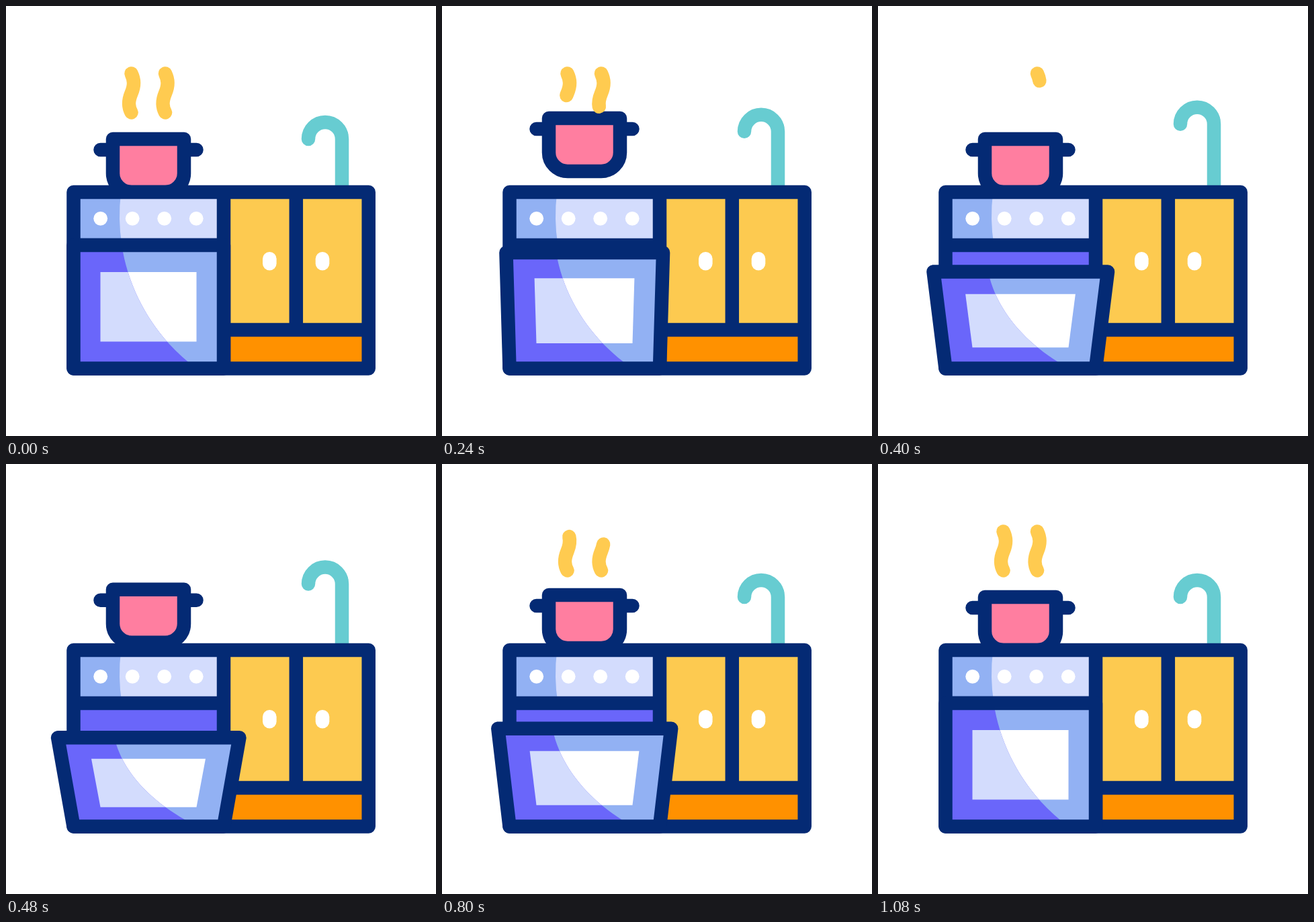
These frames come from a looping animation (640 by 640 pixels, 1520 ms). An HTML page:

```html
<!DOCTYPE html>
<html lang="en">
<head>
<meta charset="utf-8">
<title>Kitchen</title>
<style>
  html, body { margin: 0; width: 100%; height: 100%; overflow: hidden; background: #fff; }
  svg { display: block; width: 100%; height: 100%; }
  .line { fill: none; stroke: #042a74; stroke-width: 20.5; stroke-linecap: round; stroke-linejoin: round; }
  .steam { fill: none; stroke: #ffcb50; stroke-width: 20.5; stroke-linecap: round; }
</style>
</head>
<body>
<svg viewBox="0 0 640 640">
  <defs>
    <clipPath id="shadeClip"><path id="shade"/></clipPath>
  </defs>

  <path id="faucet" fill="none" stroke="#67ccd1" stroke-width="20.5" stroke-linecap="round"/>

  <g id="pot">
    <path fill="#ff7ea0" d="M159 198H265V249a28 28 0 0 1 -28 28H187a28 28 0 0 1 -28 -28Z"/>
    <path class="line" d="M159 198H265V249a28 28 0 0 1 -28 28H187a28 28 0 0 1 -28 -28ZM140.5 214H159M265 214H283.5"/>
  </g>

  <path class="steam" id="steamA" pathLength="1" d="M186.5 100.5C191 110 191.5 118 186.5 130C181.5 142 182 150 186.5 158.5"/>
  <path class="steam" id="steamB" pathLength="1" d="M237 100.5C241.5 110 242 118 237 130C232 142 232.5 150 237 158.5"/>

  <rect x="324" y="277" width="216" height="205" fill="#fdca50"/>
  <rect x="324" y="482" width="216" height="58" fill="#ff9100"/>
  <rect x="101" y="277" width="223" height="79" fill="#d3dcfd"/>
  <path fill="#92b1f3" d="M101 277H171.2A284 284 0 0 0 172.4 356H101Z"/>
  <rect x="101" y="356" width="223" height="184" fill="#6a66fa"/>
  <g fill="#fff">
    <circle cx="140.7" cy="316.3" r="10.4"/>
    <circle cx="188.2" cy="316.3" r="10.4"/>
    <circle cx="235.7" cy="316.3" r="10.4"/>
    <circle cx="283.2" cy="316.3" r="10.4"/>
    <rect x="382" y="366" width="20.6" height="27.6" rx="10.3"/>
    <rect x="460.7" y="366" width="20.6" height="27.6" rx="10.3"/>
  </g>
  <path class="line" d="M100.5 277H539.7V539.5H100.5ZM324 277V539.5M431.8 277V482M324 482H539.7M100.5 356H324"/>

  <path id="panel" fill="#92b1f3"/>
  <path id="glass" fill="#fff"/>
  <g clip-path="url(#shadeClip)">
    <path id="panelShade" fill="#6a66fa"/>
    <path id="glassShade" fill="#d3dcfd"/>
  </g>
  <path class="line" id="doorEdge"/>
</svg>
<script>
  const LOOP = 1520, STEP = 40;
  const el = id => document.getElementById(id);
  const setPath = (d, ...ids) => ids.forEach(id => el(id).setAttribute('d', d));
  const progress = (t, from, to) => Math.min(1, Math.max(0, (t - from) / (to - from)));
  const smooth = p => p * p * (3 - 2 * p);
  const thereAndBack = (t, a, b, c, d) => smooth(progress(t, a, b)) - smooth(progress(t, c, d));
  const quad = (left, right, top, inset, bottom) =>
    `M${left} ${top}H${right}L${right - inset} ${bottom}H${left + inset}Z`;

  function drawDoor(k) {
    const top = 356 + 57 * k, spread = 26 * k;
    setPath(quad(100.5 - spread, 324 + spread, top, spread, 539.5), 'panel', 'panelShade', 'doorEdge');
    setPath(quad(140.5 - 15 * k, 283.5 + 15 * k, 396 + 47.5 * k, 15 * k, 499.5 + 12.5 * k), 'glass', 'glassShade');
    setPath(`M0 ${top}H${172 - 11 * k}L${174 - 11 * k} ${top + 10}` +
      `C${186.4 - 9.5 * k} ${429.8 + 34.5 * k} ${220.3 - 6 * k} ${487.1 + 14.5 * k} ${270.5 - 5 * k} 529.3` +
      `L282 540H0Z`, 'shade');
  }

  // The pot hops three times, each hop a lower parabola.
  function potLift(t) {
    const hop = (t - 80) / 320;
    const height = [31, 15, 4][Math.floor(hop)] || 0;
    const p = hop - Math.floor(hop);
    return height * 4 * p * (1 - p);
  }

  // Steam leaves through the top, then grows again from the bottom.
  function drawSteam(id, t) {
    const left = 1 - progress(t, 80, 356) ** 1.5;
    const grown = 1 - (1 - progress(t, 520, 900)) ** 1.5;
    const shown = left + grown;
    const node = el(id);
    node.style.visibility = shown > 0 ? 'visible' : 'hidden';
    node.setAttribute('stroke-dasharray', `${shown} 3`);
    node.setAttribute('stroke-dashoffset', grown > 0 ? grown - 1 : 0);
  }

  function draw(t) {
    drawDoor(thereAndBack(t, 110, 570, 620, 1080));
    el('pot').setAttribute('transform', `translate(0 ${-potLift(t)})`);
    drawSteam('steamA', t);
    drawSteam('steamB', t - 80);
    const y = 198 - 22.3 * thereAndBack(t, 80, 400, 400, 755);
    setPath(`M450 ${y}a25 25 0 0 1 50 0V277`, 'faucet');
  }

  const start = performance.now();
  function tick() {
    const t = (performance.now() - start) % LOOP;
    draw(Math.floor(t / STEP) * STEP);
    requestAnimationFrame(tick);
  }
  tick();
</script>
</body>
</html>
```
